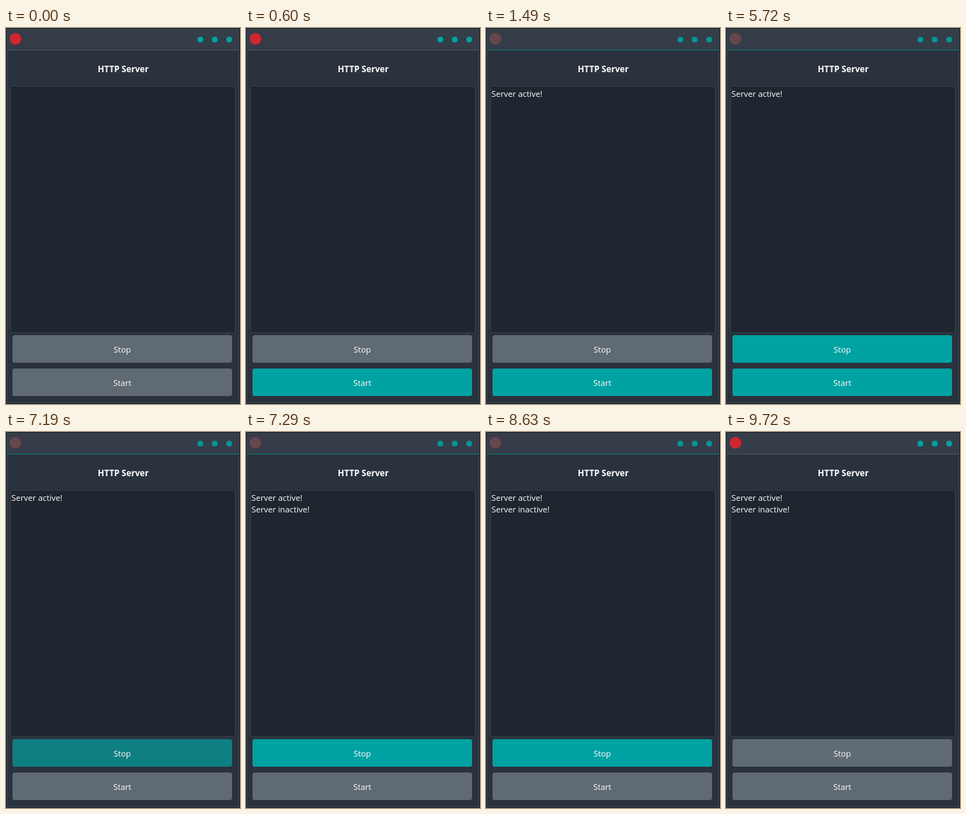
These frames come from a looping animation (324x519 px, 9890 ms). An HTML page:

```html
<!DOCTYPE html>
<html lang="en">
<head>
<meta charset="utf-8">
<title>HTTP Server</title>
<style>
  html, body { margin: 0; width: 100%; height: 100%; overflow: hidden; background: #2a323d; }
  svg { display: block; width: 324px; height: 519px; }
  text { font: 11.35px "Open Sans", "Noto Sans", sans-serif; fill: #fff; }
  .title { font-size: 11.7px; font-weight: 700; }
  .mid { text-anchor: middle; }
</style>
</head>
<body>
<svg viewBox="0 0 324 519">
  <defs>
    <linearGradient id="bar" x1="0" y1="0" x2="0" y2="1">
      <stop offset="0" stop-color="#363e4a"/>
      <stop offset="1" stop-color="#343c48"/>
    </linearGradient>
  </defs>
  <rect width="324" height="519" fill="#2a323d"/>
  <rect width="324" height="30" fill="url(#bar)"/>
  <rect x="1.5" y="1.5" width="321" height="516" fill="none" stroke="#3b444f"/>
  <rect x=".5" y=".5" width="323" height="518" fill="none" stroke="#171d25"/>
  <rect id="line" x="1" y="30" width="322" height="1" fill="#4a525c"/>
  <circle id="icon" cx="13" cy="15" r="8" fill="#cf2630"/>
  <g id="dots" fill="#00a2a2">
    <circle cx="269" cy="16" r="4"/>
    <circle cx="289" cy="16" r="4"/>
    <circle cx="309" cy="16" r="4"/>
  </g>
  <text class="title mid" x="162.3" y="61">HTTP Server</text>
  <rect x="6.5" y="80.5" width="311" height="340" rx="2" fill="#1f262f" stroke="#353e49"/>
  <text id="on" x="7.6" y="95" opacity="0">Server active!</text>
  <text id="off" x="7.6" y="111" opacity="0">Server inactive!</text>
  <rect id="stop" x="9" y="424" width="304" height="38" rx="3" fill="#606a72"/>
  <text class="mid" x="161" y="448">Stop</text>
  <rect id="start" x="9" y="470" width="304" height="38" rx="3" fill="#606a72"/>
  <text class="mid" x="161" y="494">Start</text>
</svg>
<script>
const LOOP = 9890;
const IDLE = '#606a72', HOVER = '#00a2a2', DOWN = '#0e7f82';

// Each step is [time in ms, value], held until the next step.
function hold(id, prop, steps) {
  const frames = steps.map(([ms, value]) => ({
    offset: ms / LOOP, [prop]: value, easing: 'steps(1, end)'
  }));
  frames.push({ offset: 1, [prop]: steps[steps.length - 1][1] });
  document.getElementById(id).animate(frames, { duration: LOOP, iterations: Infinity });
}

function whileFocused(id, blurred, focused) {
  hold(id, 'fill', [[0, blurred], [1310, focused], [9720, blurred]]);
}

whileFocused('line', '#4a525c', '#0c7777');
whileFocused('icon', '#cf2630', '#65474c');
whileFocused('dots', '#00a2a2', '#079496');

hold('start', 'fill', [
  [0, IDLE], [600, HOVER], [1310, DOWN], [1490, HOVER],
  [7190, IDLE], [8360, HOVER], [8630, IDLE]
]);
hold('stop', 'fill', [
  [0, IDLE], [5720, HOVER], [7190, DOWN], [7290, HOVER], [9720, IDLE]
]);
hold('on', 'opacity', [[0, 0], [1490, 1]]);
hold('off', 'opacity', [[0, 0], [7290, 1]]);
</script>
</body>
</html>
```
